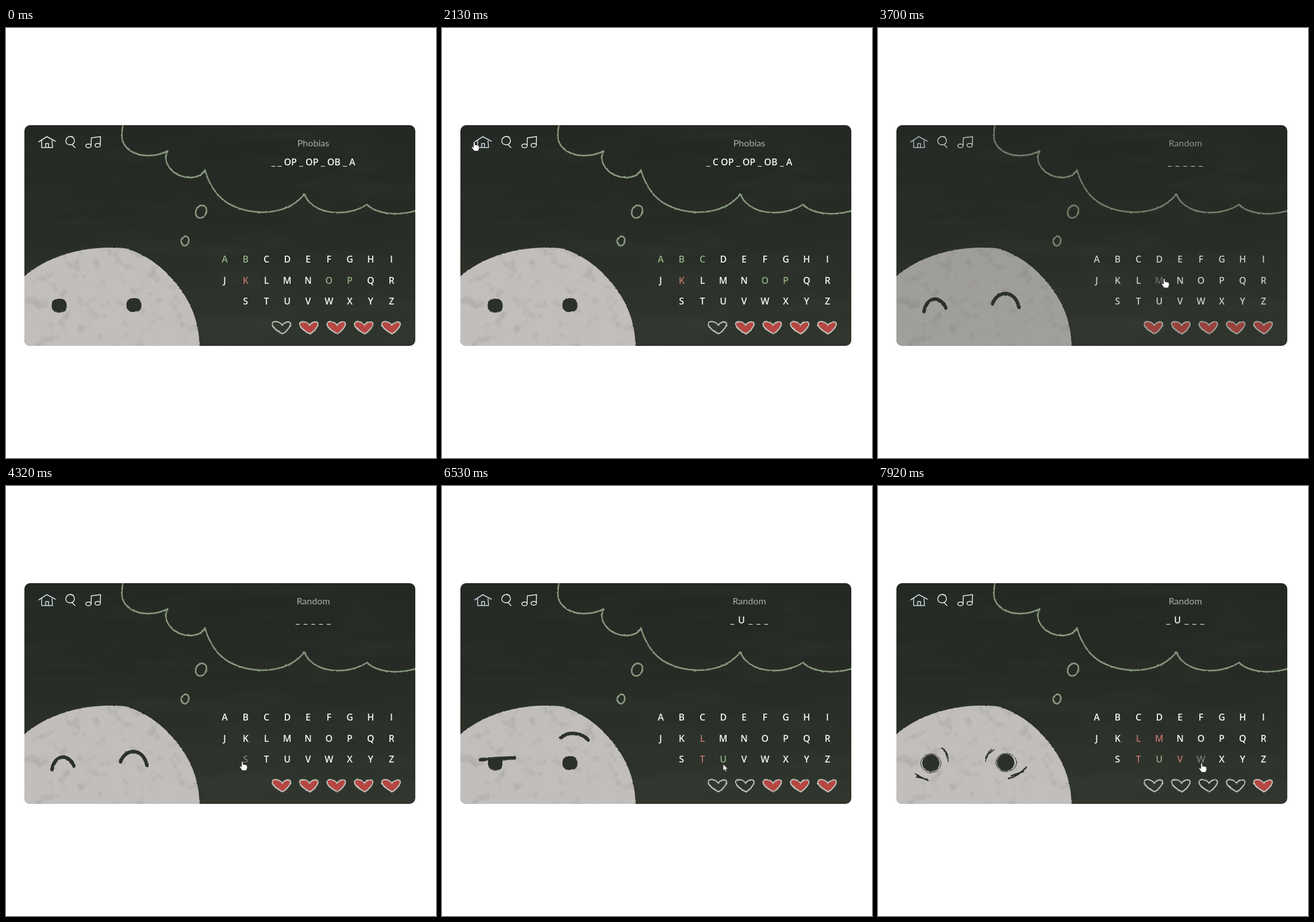
Animation of 748x748 px, one loop 7.99 s. Source, as an HTML page:

```html
<!DOCTYPE html>
<html lang="en">
<head>
<meta charset="utf-8">
<title>Chalkboard word game</title>
<style>
html, body { margin: 0; width: 100%; height: 100%; overflow: hidden; background: #fff; }
main { position: fixed; inset: 0; overflow: hidden; contain: strict; }
svg { position: absolute; left: 0; top: 0; display: block; }
.layer { width: 100%; height: 100%; clip-path: inset(169px 36px 195px 32px round 10px); will-change: opacity; }
.line { fill: none; stroke-linecap: round; stroke-linejoin: round; }
.icon { stroke: #eceeea; stroke-width: 1.5; }
.green { stroke: #87997f; stroke-width: 2.7; }
.grey { stroke: #adaeab; stroke-width: 4.2; }
.pink { stroke: #a67f9d; stroke-width: 3.8; }
.yellow { stroke: #b9a954; stroke-width: 3; }
.red { stroke: #af514a; stroke-width: 3; }
.ink { stroke: #2b302a; stroke-width: 6; }
.dark { fill: #2b302a; }
.rough { filter: url(#rough); }
.heart path { stroke: #bdbfb6; stroke-width: 2.2; fill: #b64642; }
.heart.lost path { fill: none; }
text { text-anchor: middle; font-family: "Open Sans", "Noto Sans", sans-serif; }
.key, #word { font-size: 16px; font-weight: 600; fill: #f4f5f2; }
.key.dim { fill: #777b75; }
.key.good { fill: #8fae83; }
.key.bad { fill: #b8746a; }
.lato { font-family: Lato, sans-serif; }
#cursor { width: 30px; height: 30px; overflow: visible; will-change: transform; }
#cursor path { fill: #fff; stroke: #222; stroke-width: .8; stroke-linejoin: round; }
</style>
</head>
<body>
<main>
<svg class="layer" id="board">
  <defs>
    <linearGradient id="slate" x2="0" y2="1">
      <stop offset="0" stop-color="#242823"/>
      <stop offset=".45" stop-color="#272b25"/>
      <stop offset="1" stop-color="#30352e"/>
    </linearGradient>
    <filter id="rough" filterUnits="userSpaceOnUse" x="0" y="0" width="748" height="748" color-interpolation-filters="sRGB">
      <feTurbulence type="fractalNoise" baseFrequency=".2" numOctaves="2" seed="4"/>
      <feDisplacementMap in="SourceGraphic" scale="2.4" xChannelSelector="R" yChannelSelector="G"/>
      <feGaussianBlur stdDeviation=".45"/>
    </filter>
    <filter id="smear" color-interpolation-filters="sRGB">
      <feTurbulence type="fractalNoise" baseFrequency=".006 .03" numOctaves="3" seed="8"/>
      <feColorMatrix values="0 0 0 0 .6  0 0 0 0 .65  0 0 0 0 .58  .1 0 0 0 -.045"/>
    </filter>
    <filter id="mottle" color-interpolation-filters="sRGB">
      <feTurbulence type="fractalNoise" baseFrequency=".045" numOctaves="5" seed="11"/>
      <feColorMatrix values="0 0 0 0 .5  0 0 0 0 .5  0 0 0 0 .49  .9 0 0 0 -.5"/>
    </filter>
    <clipPath id="headClip"><use href="#head"/></clipPath>
    <path id="head" d="M20 442 L32 432 C66 402 120 383 175 382 C194 382 208 382 217 386 C246 397 269 414 287 434 C316 466 337 503 337 560 H20Z"/>
    <g id="note" class="line icon">
      <path d="M148 204 L148.500 191 L164.500 189 L164 203"/>
      <ellipse cx="143.500" cy="205" rx="4.700" ry="3.300"/>
      <ellipse cx="159.500" cy="204" rx="4.700" ry="3.300"/>
    </g>
  </defs>
  <rect x="32" y="169" width="680" height="384" fill="url(#slate)"/>
  <rect x="32" y="169" width="680" height="384" filter="url(#smear)"/>
</svg>

<svg class="layer" id="game">
  <g class="rough">
    <path class="line green" d="M204 165 C200 185 200 199 210 208 C228 227 262 224 281 214 C274 228 281 240 288 247 C303 263 337 266 346 247 C354 275 370 297 390 307 C430 328 490 326 519 289 C534 327 595 329 628 307 C646 325 684 327 716 317"/>
    <path class="line green" d="M345 310 C337 305 329 314 330 324 C334 335 347 331 349 318 C349 307 338 307 334 312 M306 366 C303 372 306 378 311 379 C319 377 320 367 315 363 C311 361 308 363 306 368"/>
    <use href="#head" fill="#c1bebb"/>
  </g>
  <rect x="20" y="370" width="330" height="190" filter="url(#mottle)" clip-path="url(#headClip)"/>
  <path id="home" class="line icon" d="M57 198 L71 189 L86 197 M62 196 L62 208 L81 208 L80 196 M69 207 L69 201 L74 201 L74 207"/>
  <path class="line icon" d="M117 190 C111 186 104 191 104 197 C105 204 114 205 118 200 C120 196 119 190 113 189 M115 203 L120 208"/>
  <use href="#note"/>
  <g id="happy" class="rough">
    <path class="line ink" d="M80 493 C85 466 109 465 118 487 M199 480 C208 455 239 455 245 486"/>
  </g>
  <g id="neutral" class="rough dark">
    <rect x="79.500" y="471" width="26" height="24" rx="10"/>
    <rect x="209.500" y="470" width="26" height="24" rx="10"/>
  </g>
  <g id="smirk" class="rough dark">
    <path d="M80 474 H105 V486 Q103 495 93 495 Q82 495 80 485Z"/>
    <rect x="209.500" y="470" width="26" height="24" rx="10"/>
    <path class="line ink" d="M67 476 C80 475 95 474 126 473 M207 438 C220 425 245 430 254 442"/>
  </g>
  <g id="worried" class="rough dark">
    <circle cx="92" cy="482" r="15"/><circle cx="222" cy="481" r="15"/>
    <g class="line" stroke="#2b302a" stroke-width="1">
      <ellipse cx="92" cy="482" rx="17.500" ry="16.500"/><ellipse cx="223" cy="481" rx="18" ry="16"/>
      <path d="M113 457 Q123 464 122 479 M110 456 Q119 460 120 474 M187 479 Q189 465 202 459 M187 474 Q191 463 198 458" stroke-width="1.600"/>
      <path d="M65 501 Q74 507 87 512 M68 506 L85 510 M227 509 Q244 505 258 489 M232 504 L252 497" stroke-width="2.600"/>
    </g>
  </g>
  <g id="hmph" class="line rough" stroke="#c8c8c3" stroke-width="4.500">
    <path d="M76 340 L82 371 M90 338 L92 366 M81 357 L92 353 M99 349 L102 368 M101 356 Q108 341 110 364 M110 355 Q118 339 121 363 M128 347 L131 368 M129 349 C142 341 147 359 131 360 M154 336 L157 360 M157 352 C164 340 175 343 176 356 M241 359 L235 371 M262 367 L251 378"/>
  </g>
  <text id="topic" class="lato" x="534.500" y="205.500" font-size="16" font-weight="500" fill="#a0a69d"></text>
  <text id="word" x="534.500" y="239"></text>
  <g id="keys"></g>
  <g id="hearts" class="rough"></g>
</svg>

<svg class="layer" id="menu">
  <use href="#note" x="-82"/>
  <g class="line rough">
    <g class="grey">
      <ellipse cx="215.500" cy="344" rx="81" ry="72.500" transform="rotate(-10 215.500 344)"/>
      <path d="M155 301 Q170 287 194 291"/>
      <path d="M237 244 L239 259 M264 236 L255 257 M277 253 L267 262 M191 332 L208 334 M240 318 L247 309 M230 358 C238 363 244 358 245 350"/>
      <ellipse cx="129" cy="427" rx="25" ry="23"/>
      <ellipse cx="330" cy="320" rx="23" ry="18"/>
      <path d="M122 404 Q107 389 104 365 Q69 378 57 405 L53 433 Q80 463 110 502 Q124 480 153 470 L146 452 M68 428 Q73 414 88 410 M73 434 Q85 421 102 414 M89 464 Q99 454 112 452 M96 473 Q111 460 128 457 M111 476 L126 468"/>
      <g fill="#adaeab" stroke="none"><circle cx="201" cy="344" r="5"/><circle cx="254.500" cy="321" r="6"/></g>
    </g>
    <g class="pink">
      <path d="M112 292 C99 278 114 263 122 269 C128 273 121 285 112 292 C125 280 140 288 135 297 C128 305 116 297 112 292 C120 300 107 324 98 317 C92 310 102 298 112 292 C102 302 84 299 90 291 C96 285 106 288 112 292"/>
      <path d="M332 404 C312 408 297 394 309 388 C322 385 330 395 332 404 C328 385 354 384 355 391 C352 400 340 403 332 404 C347 396 366 398 365 410 C354 421 340 412 332 404 C330 420 315 433 304 428 C297 414 319 404 332 404"/>
    </g>
    <g fill="#b3a54e"><circle cx="112" cy="292" r="5"/><ellipse cx="332" cy="404" rx="6" ry="7"/></g>
    <path class="yellow" d="M322 299 L323 291 L336 288 L338 297 M328 338 L330 352 L340 361 L346 350 L344 336 M331 347 L344 349 M676 385 L650 466 L649 496 L668 478 L698 393 Z M684 389 L657 469 M691 392 L663 474 M650 466 L657 470 L663 474 L668 478 M650 491 L655 490"/>
    <path class="red" d="M321 281 L335 279 L337 286 L322 288Z"/>
    <path class="red" d="M261 494 L275 456 L289 488 M265 479 L286 474 M286 460 L303 454 M291 449 L296 467 M681 368 L706 373 L699 394 L677 385Z"/>
    <g role="img" aria-label="NEF'S STORY" stroke="#6e826b" stroke-width="4.500">
      <path d="M407 298 L404 247 L438 294 L436 244 M481 242 L452 245 L455 292 L486 288 M453 268 L478 265 M499 290 L496 240 L527 237 M497 264 L521 261 M538 238 L536 250 M574 238 C558 234 545 250 554 256 C568 259 582 261 575 272 Q565 282 551 278"/>
      <path d="M493 309 C477 302 460 320 471 329 C486 333 497 339 489 351 Q479 361 464 358 M501 309 L533 306 M517 308 L518 356 M554 305 C533 309 532 352 552 353 C575 350 576 303 554 305 M584 354 L581 306 C610 295 613 327 584 329 L608 352 M613 303 L625 328 M640 300 Q632 330 627 357"/>
    </g>
    <path d="M482 461 L523 461" stroke="#cdcfca" stroke-width="5"/>
  </g>
  <text class="lato" x="516" y="438" font-size="38" font-weight="700" fill="#fff">Play</text>
  <text class="lato" x="510" y="521" font-size="20.300" font-weight="500" fill="#7d907c">Help Nef write his story!</text>
</svg>

<svg id="cursor">
  <circle id="press" r="8.500" fill="rgb(215,205,10)" fill-opacity=".62"/>
  <path id="arrow" d="M0 0 V11.500 L2.700 9 L4.600 13 L6.500 12.200 L4.700 8.300 H8.400Z"/>
  <path id="hand" d="M-1.300 1 Q0 -1.500 1.300 1 V5.500 Q3 4.300 4.200 6 Q6 5 6.800 6.800 Q8.600 6 8.700 8 V11.500 L7 16 H0 L-4.500 9.800 Q-5 7.500 -3 8.300 L-1.300 10Z"/>
</svg>
</main>

<script>
const LOOP = 7990, NEW_ROUND = 3560;
const $ = id => document.getElementById(id);
const within = (t, from, to) => t >= from && t < to;
const ramp = (t, from, to) => Math.min(1, Math.max(0, (t - from) / (to - from)));

// time, x, y of the pointer tip
const path = [
  [70, 665, 748], [210, 670, 590], [350, 640, 460], [490, 520, 366], [630, 385, 380],
  [720, 356, 410], [830, 425, 446], [900, 425, 446], [1170, 452, 402], [1240, 452, 400],
  [1400, 452, 400], [1650, 60, 198], [1720, 56, 198], [2340, 56, 198], [2680, 560, 420],
  [2820, 566, 427], [3020, 520, 425], [3560, 520, 425], [4250, 411, 479], [4390, 411, 479],
  [4620, 452, 440], [4900, 452, 440], [5350, 463, 490], [5770, 463, 490], [5980, 488, 482],
  [6460, 489, 484], [6530, 489, 484], [6760, 489, 442], [6980, 489, 442], [7200, 525, 478],
  [7640, 525, 478], [7850, 563, 482], [LOOP, 563, 482]
];
const presses = [1240, 1880, 3020, 4640, 5420, 6100, 6780, 7220];
const hits = [4950, 5630, 7000, 7430];

// letter: time picked, time graded, grade
const rounds = [
  { A: [0, 0, 'good'], B: [0, 0, 'good'], O: [0, 0, 'good'], P: [0, 0, 'good'],
    K: [0, 0, 'bad'], C: [1290, 1440, 'good'] },
  { L: [4700, 5850, 'bad'], T: [5560, 5850, 'bad'], U: [6150, 6300, 'good'],
    M: [6840, 7150, 'bad'], V: [7300, 7660, 'bad'] }
];

function add(parent, tag, attrs) {
  const el = document.createElementNS('http://www.w3.org/2000/svg', tag);
  for (const name in attrs) el.setAttribute(name, attrs[name]);
  return parent.appendChild(el);
}

const keys = [...'ABCDEFGHIJKLMNOPQRSTUVWXYZ'].map((letter, i) => {
  const slot = i < 18 ? i : i + 1;
  const x = 380.5 + slot % 9 * 36.25, y = 402.5 + Math.floor(slot / 9) * 36.5;
  const el = add($('keys'), 'text', { x, y: y + 5.5 });
  el.textContent = letter;
  return { letter, x, y, el };
});

const hearts = [0, 1, 2, 3, 4].map(i => {
  const g = add($('hearts'), 'g', { transform: `translate(${479 + i * 47.7} 521)` });
  add(g, 'path', { d: 'M1.500 -4 C-3 -11 -16 -13 -16 -6 C-16 1 -5 7 2 11 C8 8 17 -2 16 -7 C15 -12 5 -10 1.500 -4Z' });
  return g;
});

const cache = new Map();
function once(id, value, apply) {
  if (cache.get(id) === value) return;
  cache.set(id, value);
  apply(value);
}
const show = (id, on) => once(id, on, v => $(id).style.display = v ? '' : 'none');
const fade = (id, amount) => once(id + '-fade', amount, v => $(id).style.opacity = v);
const write = (id, text) => once(id, text, v => $(id).textContent = v);

function pointer(t) {
  const next = Math.max(1, path.findIndex(p => p[0] > t));
  const [t0, x0, y0] = path[next - 1], [t1, x1, y1] = path[next];
  const k = ramp(t, t0, t1);
  return [x0 + (x1 - x0) * k, y0 + (y1 - y0) * k];
}

function draw(t) {
  const second = t >= NEW_ROUND, [x, y] = pointer(t);
  const picks = rounds[+second], playing = t < 2270 || second;
  let hand = within(t, 1600, 2270) && y < 215 || within(t, 2970, 3230);

  fade('game', second ? ramp(t, 3560, 3740) : 1 - ramp(t, 2270, 2400));
  fade('menu', ramp(t, 2270, 2400) * (1 - ramp(t, 3090, 3230)));

  for (const { letter, x: kx, y: ky, el } of keys) {
    const pick = picks[letter], picked = pick && t >= pick[0];
    const over = !picked && playing && t >= 70 && Math.abs(x - kx) < 15 && Math.abs(y - ky) < 17;
    if (over) hand = true;
    const state = picked ? (t >= pick[1] ? pick[2] : 'dim') : over ? 'dim' : '';
    once(letter, state, v => el.setAttribute('class', 'key ' + v));
  }

  const lost = second ? hits.filter(h => t >= h).length : 1;
  hearts.forEach((g, i) => once('heart' + i, i < lost, v => g.setAttribute('class', v ? 'heart lost' : 'heart')));

  write('topic', second ? 'Random' : 'Phobias');
  write('word', second ? (t < 6300 ? '_ _ _ _ _' : '_ U _ _ _')
    : t < 1440 ? '_ _ OP _ OP _ OB _ A' : '_ C OP _ OP _ OB _ A');
  once('gap', second, v => $('word').style.wordSpacing = v ? '2.5px' : '0');
  once('tint', t >= 1600, v => $('home').style.stroke = v ? '#cadde5' : '');

  const mood = !second || within(t, 5020, 5850) ? 'neutral'
    : t < 5020 ? 'happy' : t < 7150 ? 'smirk' : 'worried';
  for (const id of ['happy', 'neutral', 'smirk', 'worried']) show(id, id === mood);
  show('hmph', within(t, 5220, 5850));

  show('cursor', t >= 70);
  show('press', presses.some(p => within(t, p, p + 160)));
  show('hand', hand);
  show('arrow', !hand);
  $('cursor').style.transform = `translate(${x}px, ${y}px)`;
}

const start = performance.now();
function tick() {
  draw((performance.now() - start) % LOOP);
  requestAnimationFrame(tick);
}
tick();
</script>
</body>
</html>
```
